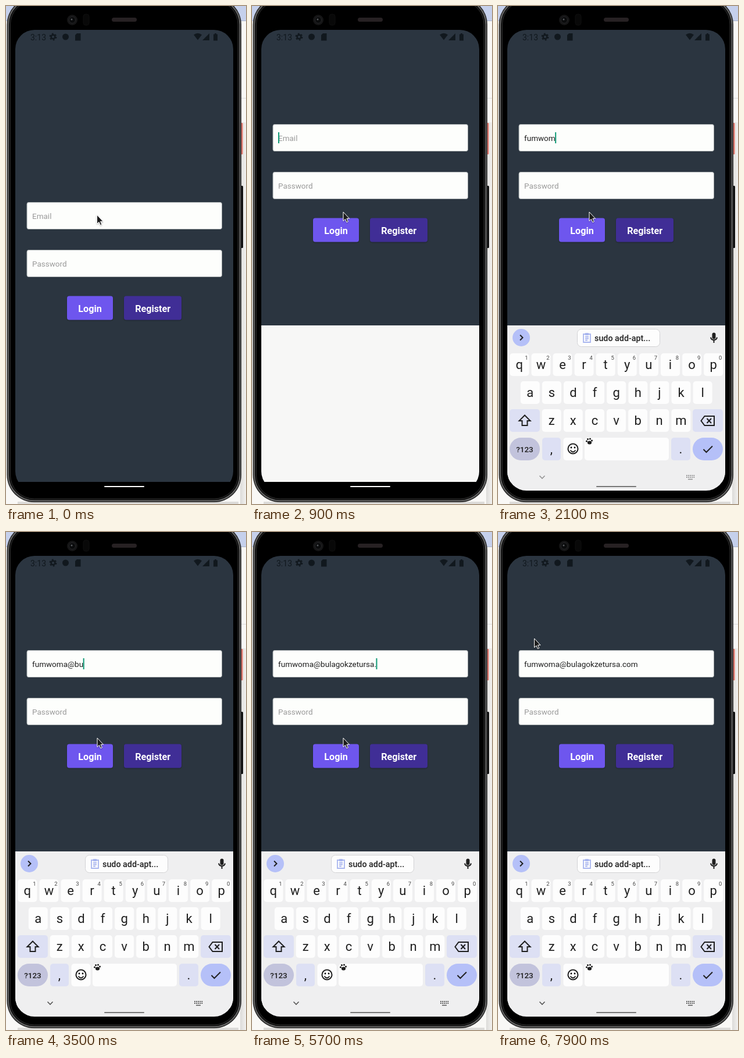
An HTML page that plays this animation: 413x856 px, repeating every 8 s.

```html
<!DOCTYPE html>
<html lang="en">
<head>
<meta charset="utf-8">
<title>Login form</title>
<style>
html, body { margin: 0; width: 100%; height: 100%; overflow: hidden; background: #f6f5f3; }
svg { display: block; width: 413px; height: 856px; font-family: Roboto, sans-serif; }
.field { fill: #fdfefc; stroke: #a3a9ab; }
.hint { fill: #9a9a9a; }
.input { font-size: 13.5px; }
.btn { font-size: 16.2px; font-weight: 700; fill: #fff; text-anchor: middle; }
.line { fill: none; stroke: #1f1f1f; stroke-width: 2; }
.key { font-size: 22px; fill: #1f1f1f; text-anchor: middle; }
.num { font-size: 9.5px; fill: #444; text-anchor: middle; }
</style>
</head>
<body>
<svg viewBox="0 0 413 856">
  <defs>
    <clipPath id="glass"><rect x="16" y="41" width="375" height="792" rx="33"/></clipPath>
    <linearGradient id="shade"><stop stop-color="#dcdbd9"/><stop offset="1" stop-color="#f2f1ef"/></linearGradient>
    <filter id="drop" x="-30%" y="-30%" width="160%" height="180%">
      <feDropShadow dx="0" dy="1" stdDeviation=".8" flood-opacity=".35"/>
    </filter>
  </defs>

  <!-- desktop behind the phone -->
  <path fill="#f9f8f6" d="M0 0H413V856H0Z"/>
  <path fill="#c5d0ec" d="M0 0H413V25H0Z"/>
  <path fill="#a9b2c8" d="M0 25H413V26H0Z"/>
  <path fill="url(#shade)" d="M403 200H413V856H403Z"/>
  <path fill="#dcdcdc" d="M403 158H413V159H403Z"/>
  <path fill="#dcdbd9" d="M20 852H400V856H20Z"/>

  <!-- phone body -->
  <rect x="402" y="201" width="5.5" height="54" rx="1" fill="#e0766b"/>
  <rect x="402" y="309" width="6" height="107" rx="1.5" fill="#111"/>
  <rect x="1.500" y="-15" width="403.500" height="868" rx="47" fill="#262626"/>
  <rect x="4" y="-12.500" width="398.500" height="863" rx="44.500" fill="#111" stroke="#6a6a6a" stroke-width="1.800"/>
  <rect x="7.500" y="-9" width="391.500" height="856" rx="41" fill="#000" stroke="#2c2c2c"/>
  <circle cx="114" cy="24" r="9" fill="#151516"/>
  <circle cx="114" cy="24" r="5.500" fill="#0a0b0c" stroke="#252527"/>
  <circle cx="113" cy="23" r="1.500" fill="#55585c"/>
  <rect x="133" y="14" width="10" height="19" rx="4" fill="#080808" stroke="#0e0e0e"/>
  <rect x="182" y="20" width="43" height="7" rx="3.500" fill="#272123"/>

  <g clip-path="url(#glass)">
    <path fill="#2b3540" d="M16 41H391V818H16Z"/>
    <g id="status" fill="#11181e">
      <text x="42" y="58.5" font-size="14">3:13</text>
      <circle cx="81" cy="53" r="3.4" fill="none" stroke="#11181e" stroke-width="2.6"/>
      <circle cx="81" cy="53" r="5.4" fill="none" stroke="#11181e" stroke-width="2" stroke-dasharray="2.8 2.85"/>
      <circle cx="102.5" cy="53" r="5.5"/>
      <path d="M122 47H128.5V59.5H119V50Z"/>
      <path d="M323 49.5Q330 44 337 49.5L330 58.5Z"/>
      <path d="M350 47V59H338Z"/>
      <path d="M357 48.5H359V47H362V48.5H364V59.5H357Z"/>
    </g>

    <path id="blank" fill="#f7f7f6" d="M16 549H391V818H16Z"/>
    <g id="form">
      <rect class="field" x="36" y="337.5" width="335.5" height="46" rx="3"/>
      <rect class="field" x="36" y="419.5" width="335.5" height="46" rx="3"/>
      <text id="email" class="input" x="45" y="366"></text>
      <text class="input hint" x="45" y="448">Password</text>
      <rect id="caret" y="351" width="2" height="19" fill="#0f9a76"/>
      <rect x="105" y="498.5" width="79" height="41" rx="4" fill="#6e56ee" filter="url(#drop)"/>
      <rect x="203" y="498.5" width="99" height="41" rx="4" fill="#3f2d96" filter="url(#drop)"/>
      <text class="btn" x="144.5" y="525.5">Login</text>
      <text class="btn" x="252.7" y="525.5">Register</text>
    </g>

    <rect x="169" y="825" width="69" height="2" rx="1" fill="#fff"/>
    <g id="board">
      <path fill="#efeff0" d="M16 549H391V834H16Z"/>
      <circle cx="40" cy="570" r="15" fill="#b5c0f8"/>
      <path class="line" d="M38 565.5L42.5 570L38 574.5"/>
      <rect x="136.5" y="555.5" width="142" height="30" rx="7" fill="#fdfdfd" stroke="#d2d2d4"/>
      <path fill="none" stroke="#a9b6ef" stroke-width="1.8" d="M147 564H159V578H147ZM150 568.5H156M150 571.5H156M150 574.5H154"/>
      <path fill="#a9b6ef" d="M150 562H156V566H150Z"/>
      <text x="166" y="576" font-size="14.3" font-weight="500" fill="#1f1f1f">sudo add-apt...</text>
      <rect x="368.5" y="561.5" width="6" height="11" rx="3" fill="#1f1f1f"/>
      <path class="line" d="M366 569.5A5.6 5.6 0 0 0 377 569.5M371.5 575V579"/>
      <g id="keys"></g>
      <path class="line" d="M46 703.5L55.5 713H50.5V721H41.5V713H36.5Z"/>
      <path class="line" d="M355.5 705H372V721H355.5L349.5 713ZM359.5 709L367 717M367 709L359.5 717"/>
      <circle class="line" cx="129" cy="761" r="8.5"/>
      <path class="line" d="M124.5 763.5Q129 769.5 133.5 763.5"/>
      <circle cx="126" cy="759" r="1.4"/><circle cx="132" cy="759" r="1.4"/>
      <g fill="#1f1f1f" transform="translate(0 -1.5)">
        <ellipse cx="157.5" cy="752" rx="3.6" ry="2.9"/>
        <circle cx="152.5" cy="749.5" r="1.6"/><circle cx="154.5" cy="746" r="1.6"/>
        <circle cx="158.5" cy="745.5" r="1.6"/><circle cx="161.5" cy="748.5" r="1.6"/>
      </g>
      <path class="line" d="M353.5 762L358.5 767L369 756.5"/>
      <g id="nav">
        <path fill="none" stroke="#555" stroke-width="1.6" d="M71.5 807.5L76 812L80.5 807.5"/>
        <path fill="none" stroke="#555" stroke-width="1.8" stroke-dasharray="1.8 1.3" d="M324 807H339M324 810H339"/>
        <path stroke="#555" stroke-width="1.6" d="M327 813.5H335"/>
      </g>
      <rect x="169" y="825" width="69" height="2" rx="1" fill="#777"/>
    </g>
  </g>

  <g id="mouse" filter="url(#drop)">
    <path fill="#1b1b1c" stroke="#fff" d="M.5 1V16.500L4 13.300L6.400 18.700L8.800 17.600L6.500 12.300H11Z"/>
  </g>
</svg>

<script>
const $ = id => document.getElementById(id);
const LOOP = 8000, TICK = 100, LIFT = 134, PITCH = 37.1;
const address = 'fumwoma@bulagokzetursa.com';

// [time, letters of the address, mistyped extra]
const typing = [
  [0, 0], [1300, 1], [1400, 2], [1600, 3], [1700, 4], [1800, 5], [2100, 6], [2200, 7],
  [3000, 8], [3400, 9], [3500, 10], [3700, 12], [3900, 13], [4000, 14], [4500, 15],
  [4700, 16], [4800, 17], [5000, 18], [5100, 20], [5200, 21], [5500, 22], [5700, 23],
  [6100, 23, 'oc'], [6600, 23, 'o'], [6800, 24], [7000, 25], [7100, 26]
];
const caretShown = [[0, 0], [700, 1], [2800, 0], [3000, 1], [7600, 0]];
const pointer = [[0, 156, 358], [400, 157, 356], [500, 156.5, 353], [7900, 62, 182]];

const at = (table, t) => table.findLast(row => row[0] <= t);
const clamp = v => Math.min(1, Math.max(0, v));
const move = (id, x, y) => $(id).setAttribute('transform', `translate(${x} ${y})`);

function add(tag, attrs, text = '') {
  const el = document.createElementNS('http://www.w3.org/2000/svg', tag);
  for (const name in attrs) el.setAttribute(name, attrs[name]);
  el.textContent = text;
  $('keys').append(el);
}

function key(x, y, width, fill = '#fdfdfd', label = '', rx = 5) {
  add('rect', { x, y, width, height: 39, rx, fill });
  if (label) add('text', { class: 'key', x: x + width / 2, y: y + 26.5 }, label);
}

[['qwertyuiop', 20.3, 597], ['asdfghjkl', 38.8, 645], ['zxcvbnm', 75.7, 693]].forEach(([row, left, y], r) => {
  [...row].forEach((letter, i) => {
    const x = left + i * PITCH;
    key(x, y, 33, '#fdfdfd', letter);
    if (r === 0) add('text', { class: 'num', x: x + 28.5, y: y + 11 }, (i + 1) % 10);
  });
});
key(20, 693, 52, '#dde0f4');
key(335, 693, 52, '#dde0f4');
key(20, 742, 52, '#c2c3dc', '', 19.5);
key(76, 742, 32, '#dde0f4', ',');
key(112.5, 742, 33);
key(149, 742, 145);
key(298, 742, 33, '#dde0f4', '.');
key(335, 742, 52, '#b5c0f8', '', 19.5);
add('text', { x: 46, y: 767, 'font-size': 13.5, 'font-weight': 500, 'text-anchor': 'middle', fill: '#1f1f1f' }, '?123');

function draw(t) {
  const [, count, extra = ''] = at(typing, t);
  const typed = address.slice(0, count) + extra;
  const email = $('email');
  email.textContent = typed || 'Email';
  email.setAttribute('fill', typed ? '#1f1f1f' : '#9a9a9a');
  $('caret').setAttribute('x', typed ? 44.5 + email.getComputedTextLength() : 45);
  $('caret').setAttribute('opacity', at(caretShown, t)[1]);

  const raised = t >= 900;
  move('form', 0, raised ? -LIFT : 0);
  $('blank').setAttribute('opacity', raised ? 1 : 0);
  move('board', 0, 286 * (1 - clamp((t - 900) / 400)) ** 3);
  $('nav').setAttribute('opacity', clamp((t - 1400) / 1200));

  const [, x, y] = at(pointer, t);
  move('mouse', x, y);
}

const start = performance.now();
function frame() {
  const t = (performance.now() - start) % LOOP;
  draw(Math.floor(t / TICK) * TICK);
  requestAnimationFrame(frame);
}
frame();
</script>
</body>
</html>
```
